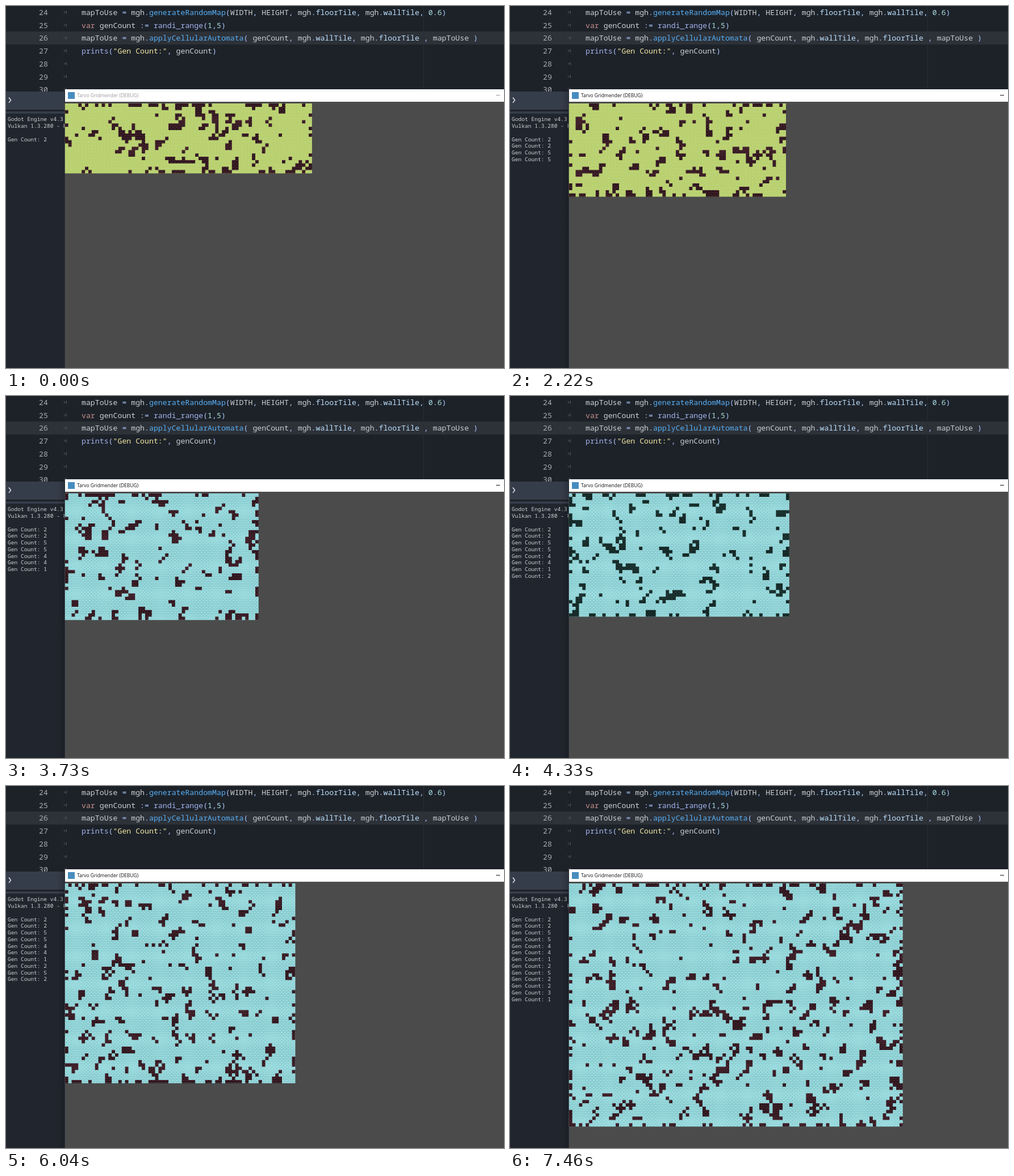
These frames come from a looping animation (877x639 px, 8000 ms). An HTML page with a canvas:

```html
<!DOCTYPE html>
<html lang="en">
<head>
<meta charset="utf-8">
<title>Map generator</title>
<style>
html, body { margin: 0; width: 100%; height: 100%; overflow: hidden; background: #1d2229; }
canvas { display: block; }
</style>
</head>
<body>
<canvas id="stage" width="877" height="639"></canvas>
<script>
const ctx = document.getElementById('stage').getContext('2d');
const LOOP = 8000, TILE = 5.88, MAP_X = 103.8, MAP_Y = 172;
const MONO = '"Noto Sans Mono", "DejaVu Sans Mono", monospace';
const GEN_COUNTS = '2255441252231';

// [start ms, printed counts, columns, rows, floor, wall]; without columns the window is empty
const SCENES = [
  [0, 1, 74, 21, 'grass', 'maroon'],
  [700, 1],
  [800, 1, 64, 54, 'ice', 'maroon'],
  [900, 2, 64, 54, 'ice', 'maroon'],
  [1210, 2],
  [1510, 2, 88, 41, 'ice', 'moss'],
  [1610, 3, 88, 41, 'ice', 'moss'],
  [2010, 3],
  [2220, 4, 65, 28, 'grass', 'maroon'],
  [2620, 4],
  [2720, 5, 70, 24, 'ice', 'maroon'],
  [3120, 5],
  [3320, 6, 98, 28, 'grass', 'moss'],
  [3730, 7, 58, 38, 'ice', 'maroon'],
  [4230, 7],
  [4330, 8, 66, 37, 'ice', 'moss'],
  [4840, 8],
  [4940, 9, 85, 28, 'grass', 'maroon'],
  [5440, 10, 58, 31, 'ice', 'moss'],
  [5940, 10],
  [6040, 10, 69, 60, 'ice', 'maroon'],
  [6140, 11, 69, 60, 'ice', 'maroon'],
  [6650, 11],
  [6750, 12, 86, 21, 'grass', 'moss'],
  [7260, 12],
  [7460, 13, 100, 73, 'ice', 'maroon']
];

const INK = {
  text: '#cdcfd2', symbol: '#abc9ff', call: '#57aff5', global: '#a3b4ee',
  member: '#bce0ff', keyword: '#c8908a', number: '#a8dfe0', string: '#f2e7a2'
};

// Each code line alternates ink name and text.
const CODE = [
  ['text', 'mapToUse ', 'symbol', '= ', 'text', 'mgh', 'symbol', '.', 'call', 'generateRandomMap',
    'symbol', '(', 'text', 'WIDTH', 'symbol', ', ', 'text', 'HEIGHT', 'symbol', ', ',
    'text', 'mgh', 'symbol', '.', 'member', 'floorTile', 'symbol', ', ',
    'text', 'mgh', 'symbol', '.', 'member', 'wallTile', 'symbol', ', ', 'number', '0.6', 'symbol', ')'],
  ['keyword', 'var ', 'text', 'genCount ', 'symbol', ':= ', 'global', 'randi_range', 'symbol', '(',
    'number', '1', 'symbol', ',', 'number', '5', 'symbol', ')'],
  ['text', 'mapToUse ', 'symbol', '= ', 'text', 'mgh', 'symbol', '.', 'call', 'applyCellularAutomata',
    'symbol', '( ', 'text', 'genCount', 'symbol', ', ', 'text', 'mgh', 'symbol', '.', 'member', 'wallTile',
    'symbol', ', ', 'text', 'mgh', 'symbol', '.', 'member', 'floorTile ', 'symbol', ', ',
    'text', 'mapToUse ', 'symbol', ')'],
  ['global', 'prints', 'symbol', '(', 'string', '"Gen Count:"', 'symbol', ', ', 'text', 'genCount', 'symbol', ')']
];

function randomFrom(seed) {
  return () => {
    seed = (seed + 0x6D2B79F5) | 0;
    let n = Math.imul(seed ^ (seed >>> 15), 1 | seed);
    n = (n + Math.imul(n ^ (n >>> 7), 61 | n)) ^ n;
    return ((n ^ (n >>> 14)) >>> 0) / 4294967296;
  };
}

function makePattern(paint) {
  const tile = document.createElement('canvas');
  tile.width = tile.height = 16;
  paint(tile.getContext('2d'));
  const pattern = ctx.createPattern(tile, 'repeat');
  pattern.setTransform(new DOMMatrix().translate(MAP_X, MAP_Y).scale(TILE / 16));
  return pattern;
}

function bricks(face, mortar) {
  return makePattern(g => {
    g.fillStyle = mortar;
    g.fillRect(0, 0, 16, 16);
    g.fillStyle = face;
    g.fillRect(0, 0, 14, 6);
    g.fillRect(0, 8, 6, 6);
    g.fillRect(8, 8, 8, 6);
  });
}

const TILES = {
  ice: bricks('#9fdfe2', '#7cbfc4'),
  maroon: bricks('#4a2630', '#160a0f'),
  moss: bricks('#1f3a37', '#0a1514'),
  grass: makePattern(g => {
    const random = randomFrom(4);
    g.fillStyle = '#bbd273';
    g.fillRect(0, 0, 16, 16);
    for (let i = 0; i < 14; i++) {
      g.fillStyle = i % 2 ? '#afc768' : '#c2d77b';
      g.fillRect(random() * 14, random() * 14, 2, 2);
    }
  })
};

function box(x, y, w, h, fill) {
  ctx.fillStyle = fill;
  ctx.fillRect(x, y, w, h);
}

function write(text, x, y, font, fill) {
  ctx.font = font;
  ctx.fillStyle = fill;
  ctx.fillText(text, x, y);
}

function drawEditor() {
  box(0, 0, 877, 639, '#1d2229');
  box(0, 45, 877, 23, '#2d3138');
  box(735, 0, 1, 147, '#2a2f37');
  const font = '13.22px ' + MONO;
  for (let i = 0; i < 7; i++) {
    const y = 11 + i * 22.7;
    write(String(24 + i), 58, y + 5, font, '#a9acb1');
    ctx.strokeStyle = '#4b515c';
    ctx.lineWidth = 1;
    ctx.stroke(new Path2D(`M101.5 ${y - 2.5}l2.5 2.5l-2.5 2.5M106.5 ${y - 3}v6M104 ${y}h2`));
    const spans = CODE[i] || [];
    for (let k = 0, column = 0; k < spans.length; k += 2) {
      write(spans[k + 1], 133 + column * 7.932, y + 5, font, INK[spans[k]]);
      column += spans[k + 1].length;
    }
  }
}

function drawConsole(count) {
  box(0, 151, 104, 32, '#363d4a');
  box(0, 186, 104, 4, '#363d4a');
  box(0, 190, 104, 449, '#21252e');
  ctx.strokeStyle = '#e4e6ea';
  ctx.lineWidth = 1.5;
  ctx.stroke(new Path2D('M5 161.5l3.5 4.7l-3.5 4.7'));
  const lines = ['Godot Engine v4.3.stable', 'Vulkan 1.3.280 - Forward+', '',
    ...[...GEN_COUNTS.slice(0, count)].map(n => 'Gen Count: ' + n)];
  lines.forEach((line, i) => write(line, 3, 203.3 + i * 11.75, '9.6px ' + MONO, '#cdcfd2'));
}

function drawWindow(active) {
  if (active) {
    const shadow = ctx.createLinearGradient(91, 0, 104, 0);
    shadow.addColorStop(0, '#0000');
    shadow.addColorStop(1, '#0003');
    box(91, 147, 13, 492, shadow);
  }
  box(103, 147, 1, 492, '#2a2e34');
  box(104, 147, 773, 22, '#fff');
  box(104, 169, 773, 470, '#4b4b4b');
  box(109, 152, 12, 12, '#478cbf');
  const ink = active ? '#111' : '#999';
  write('Tarvo Gridmender (DEBUG)', 125, 161, '8.5px "Open Sans", sans-serif', ink);
  box(863, 157, 7, 1, ink);
}

// Random walls survive one cellular step if at least four neighbours are walls; outside counts as wall.
function drawMap(cols, rows, floor, wall) {
  const random = randomFrom(cols * 1000 + rows);
  const noise = Array.from({ length: rows }, () => Array.from({ length: cols }, () => random() < 0.38));
  const isWall = (x, y) => noise[y]?.[x] ?? true;
  box(MAP_X, MAP_Y, cols * TILE, rows * TILE, TILES[floor]);
  ctx.fillStyle = TILES[wall];
  ctx.beginPath();
  for (let y = 0; y < rows; y++) {
    for (let x = 0; x < cols; x++) {
      if (!noise[y][x]) continue;
      let near = -1;
      for (let k = 0; k < 9; k++) near += isWall(x + k % 3 - 1, y + Math.floor(k / 3) - 1);
      if (near >= 4) ctx.rect(MAP_X + x * TILE, MAP_Y + y * TILE, TILE, TILE);
    }
  }
  ctx.fill();
}

const start = performance.now();
let shown = '';

function frame() {
  const t = (performance.now() - start) % LOOP;
  const scene = SCENES.findLast(s => s[0] <= t);
  const active = t >= 400;
  const key = scene[0] + ':' + active;
  if (key !== shown) {
    shown = key;
    const [, count, cols, rows, floor, wall] = scene;
    drawEditor();
    drawConsole(count);
    drawWindow(active);
    if (cols) drawMap(cols, rows, floor, wall);
  }
  requestAnimationFrame(frame);
}
frame();
</script>
</body>
</html>
```
